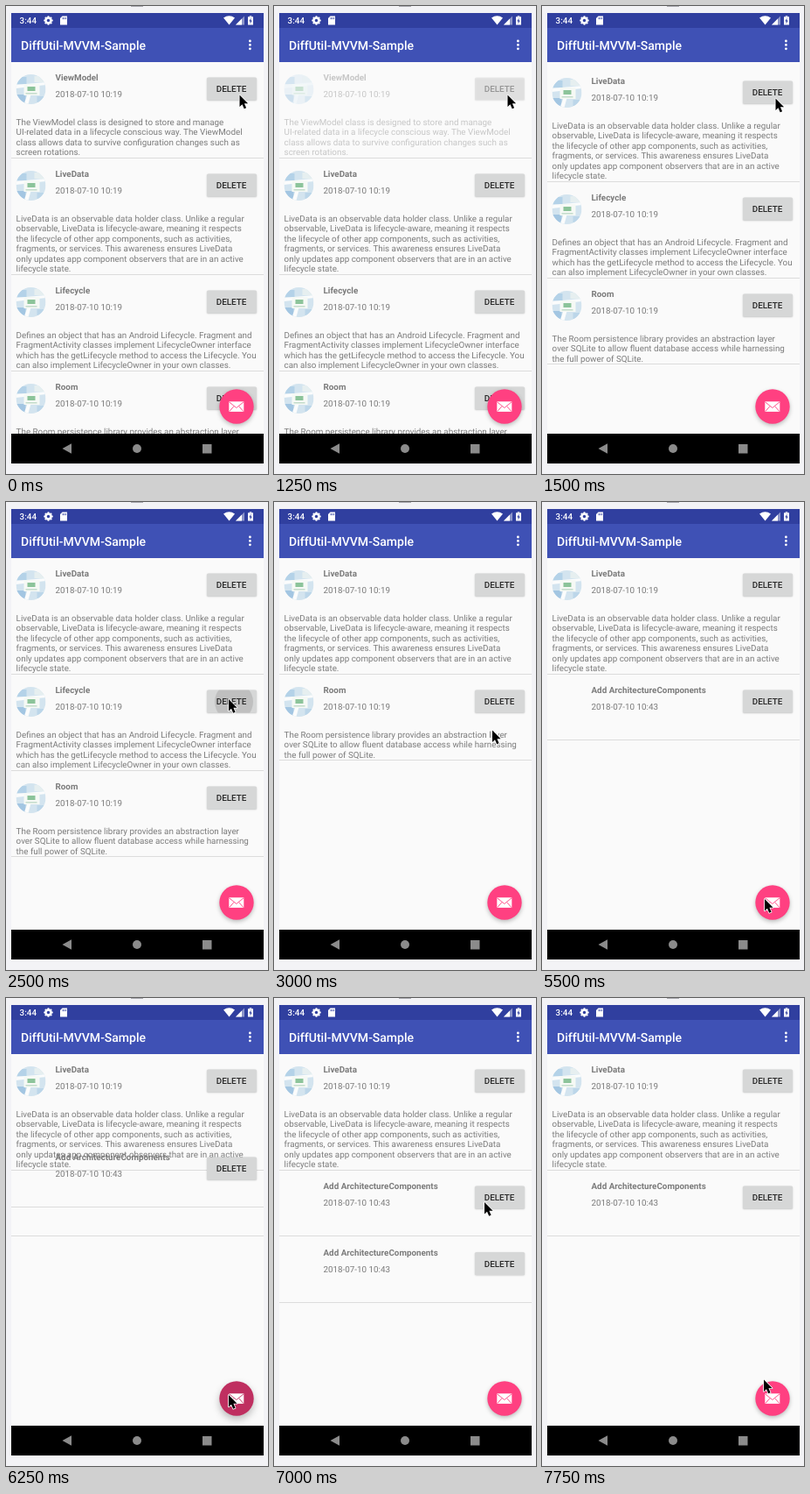
An HTML page with a canvas that plays this animation: 300 by 534 pixels, repeating every 8000 ms.

```html
<!DOCTYPE html>
<html lang="en">
<head>
<meta charset="utf-8">
<title>List demo</title>
<style>
  html, body { margin: 0; width: 100%; height: 100%; overflow: hidden; background: #f3f3f6; }
  canvas { display: block; width: 300px; height: 534px; }
</style>
</head>
<body>
<canvas id="stage" width="300" height="534"></canvas>
<script>
const ctx = document.getElementById('stage').getContext('2d');
const LOOP = 8000;
const LINE = 11.5;
const GREY = '#7b7b7b';

const cards = {
  viewModel: { title: 'ViewModel', date: '2018-07-10 10:19', photo: true, lines: [
    'The ViewModel class is designed to store and manage',
    'UI-related data in a lifecycle conscious way. The ViewModel',
    'class allows data to survive configuration changes such as',
    'screen rotations.'] },
  liveData: { title: 'LiveData', date: '2018-07-10 10:19', photo: true, lines: [
    'LiveData is an observable data holder class. Unlike a regular',
    'observable, LiveData is lifecycle-aware, meaning it respects',
    'the lifecycle of other app components, such as activities,',
    'fragments, or services. This awareness ensures LiveData',
    'only updates app component observers that are in an active',
    'lifecycle state.'] },
  lifecycle: { title: 'Lifecycle', date: '2018-07-10 10:19', photo: true, lines: [
    'Defines an object that has an Android Lifecycle. Fragment and',
    'FragmentActivity classes implement LifecycleOwner interface',
    'which has the getLifecycle method to access the Lifecycle. You',
    'can also implement LifecycleOwner in your own classes.'] },
  room: { title: 'Room', date: '2018-07-10 10:19', photo: true, lines: [
    'The Room persistence library provides an abstraction layer',
    'over SQLite to allow fluent database access while harnessing',
    'the full power of SQLite.'] },
  added: { title: 'Add ArchitectureComponents', date: '2018-07-10 10:43', photo: false, lines: [''] }
};

const { viewModel, liveData, lifecycle, room, added } = cards;
const heightOf = card => 64 + LINE * card.lines.length;
const place = (card, top, alpha = 1) => ({ card, top, alpha });

function stack(list, top = 64) {
  return list.map(card => {
    const item = place(card, top);
    top += heightOf(card);
    return item;
  });
}

function fade(items, index, alpha) {
  items[index].alpha = alpha;
  return items;
}

const steps = [
  { at: 0, cursor: [267.5, 101.5], items: stack([viewModel, liveData, lifecycle, room]), fab: 'idle' },
  { at: 1250, items: fade(stack([viewModel, liveData, lifecycle, room]), 0, 0.4) },
  { at: 1500, cursor: [267.5, 105.5], items: stack([liveData, lifecycle, room], 68) },
  { at: 1750, cursor: [255, 127], items: stack([liveData, lifecycle, room]) },
  { at: 2000, cursor: [260.5, 207] },
  { at: 2250, cursor: [255, 225] },
  { at: 2500, ripple: [261, 228] },
  { at: 2750, items: [...stack([liveData]), place(room, 253)] },
  { at: 3000, cursor: [250, 260.5], items: stack([liveData, room]) },
  { at: 3250, cursor: [250, 225] },
  { at: 3500, ripple: [257, 228] },
  { at: 3750, cursor: [218, 74], items: stack([liveData]) },
  { at: 4000, cursor: [267.5, 210] },
  { at: 4250, cursor: [267.5, 404] },
  { at: 4500, cursor: [255, 453] },
  { at: 5250, items: stack([liveData, added]), fab: 'touched' },
  { at: 5500, fab: 'idle' },
  { at: 6250, items: [...stack([liveData]), place(added, 197, 0), place(added, 164)], fab: 'pressed' },
  { at: 6500, cursor: [248, 368], items: fade(stack([liveData, added, added]), 1, 0.4), fab: 'idle' },
  { at: 6750, cursor: [239, 249], items: stack([liveData, added, added]) },
  { at: 7000, cursor: [241, 233] },
  { at: 7250, cursor: [244, 320], items: fade(stack([liveData, added, added]), 1, 0.4) },
  { at: 7500, cursor: [252, 438], items: [...stack([liveData]), place(added, 201)] },
  { at: 7750, cursor: [254, 435.5], items: stack([liveData, added]) }
];
for (let i = 1; i < steps.length; i++) {
  steps[i] = { ...steps[i - 1], ripple: null, ...steps[i] };
}

function rect(color, x, y, w, h) {
  ctx.fillStyle = color;
  ctx.fillRect(x, y, w, h);
}

function disc(color, x, y, r) {
  ctx.fillStyle = color;
  ctx.beginPath();
  ctx.arc(x, y, r, 0, Math.PI * 2);
  ctx.fill();
}

function polygon(color, points) {
  ctx.fillStyle = color;
  ctx.beginPath();
  points.forEach(([x, y]) => ctx.lineTo(x, y));
  ctx.closePath();
  ctx.fill();
}

function text(str, x, y, size, weight, color) {
  ctx.font = `${weight} ${size}px Roboto, sans-serif`;
  ctx.fillStyle = color;
  ctx.fillText(str, x, y);
}

function shadow(color, blur, dy) {
  ctx.shadowColor = color;
  ctx.shadowBlur = blur;
  ctx.shadowOffsetY = dy;
}

function drawPhoto(x, y) {
  ctx.save();
  ctx.translate(x, y);
  ctx.beginPath();
  ctx.arc(0, 0, 17, 0, Math.PI * 2);
  ctx.clip();
  rect('#d3e4ef', -17, -17, 34, 34);
  rect('#b4d2e8', -17, -14, 12, 8);
  rect('#e6eff0', 4, -15, 12, 7);
  rect('#a3c6e2', -17, 6, 11, 11);
  rect('#bcd6e9', 7, 8, 10, 7);
  polygon('#fbfcfc', [[-17, -5], [17, -8], [17, -5], [-17, -1]]);
  polygon('#fbfcfc', [[-8, 17], [-4, 6], [0, 6], [-3, 17]]);
  rect('#f6f9f5', -8, -6, 18, 13);
  rect('#8cc49a', -4, -3, 9, 5);
  rect('#c4dccb', -6, 4, 13, 1.5);
  ctx.restore();
}

function drawButton(top, ripple) {
  ctx.save();
  ctx.beginPath();
  ctx.roundRect(230, top + 17.6, 57, 25.8, 1.5);
  shadow('rgba(0,0,0,.22)', 2, 0.7);
  ctx.fillStyle = '#d6d7d7';
  ctx.fill();
  shadow('transparent', 0, 0);
  if (ripple) {
    ctx.clip();
    disc('rgba(0,0,0,.11)', ...ripple, 22);
  }
  ctx.restore();
  text('DELETE', 240.8, top + 34.3, 9.84, 500, '#262626');
}

function drawCard({ card, top, alpha }, ripple) {
  ctx.globalAlpha = alpha;
  if (card.photo) drawPhoto(28.5, top + 31);
  text(card.title, 56.5, top + 21.3, 9.84, 700, GREY);
  text(card.date, 56.5, top + 40.3, 9.84, 400, GREY);
  card.lines.forEach((line, i) => text(line, 11.6, top + 71.7 + i * LINE, 9.84, 400, GREY));
  const hit = ripple && ripple[1] > top && ripple[1] < top + 60;
  drawButton(top, hit ? ripple : null);
  ctx.globalAlpha = 1;
  rect('#dcdcdc', 6, Math.floor(top + heightOf(card) - 1), 289, 1);
}

function drawFab(state) {
  const pressed = state === 'pressed';
  const color = { idle: '#ff4081', touched: '#e23a74', pressed: '#bf2f60' }[state];
  ctx.save();
  shadow('rgba(0,0,0,.26)', pressed ? 9 : 5, pressed ? 4 : 2);
  disc(color, 264, 457, 19.7);
  ctx.restore();
  rect('#fff', 255.3, 451.3, 17, 11.6);
  ctx.strokeStyle = color;
  ctx.lineWidth = 0.9;
  ctx.beginPath();
  ctx.moveTo(255.5, 451.8);
  ctx.lineTo(263.8, 458.5);
  ctx.lineTo(272.1, 451.8);
  ctx.moveTo(255.8, 462.6);
  ctx.lineTo(261, 456.6);
  ctx.moveTo(271.8, 462.6);
  ctx.lineTo(266.6, 456.6);
  ctx.stroke();
}

function drawStatusBar() {
  rect('#303f9f', 6, 8, 289, 17);
  text('3:44', 15.6, 20, 9.84, 500, '#fff');

  for (let i = 0; i < 8; i++) {
    const angle = i * Math.PI / 4;
    disc('#fff', 48.5 + 4 * Math.cos(angle), 16.5 + 4 * Math.sin(angle), 1.2);
  }
  disc('#fff', 48.5, 16.5, 4);
  disc('#303f9f', 48.5, 16.5, 1.7);

  polygon('#fff', [[64.5, 11.5], [70, 11.5], [70, 21.5], [62, 21.5], [62, 14]]);
  for (let i = 0; i < 3; i++) rect('#303f9f', 64.6 + i * 1.7, 13, 0.8, 2.2);

  ctx.fillStyle = '#fff';
  ctx.beginPath();
  ctx.moveTo(255.5, 21.5);
  ctx.lineTo(249, 13.5);
  ctx.quadraticCurveTo(255.5, 9, 262, 13.5);
  ctx.fill();

  polygon('#8c95c9', [[273, 11.5], [273, 21.5], [263, 21.5]]);
  polygon('#fff', [[270, 14.5], [270, 21.5], [263, 21.5]]);
  rect('#fff', 277, 12.3, 6, 9.2);
  rect('#fff', 278.7, 11.3, 2.6, 1);
  polygon('#303f9f', [[280.6, 13.5], [278.3, 17.5], [279.8, 17.5], [279.4, 20.5], [281.8, 16.4], [280.3, 16.4]]);
}

function drawToolbar() {
  rect('#3f51b5', 6, 25, 289, 39);
  text('DiffUtil-MVVM-Sample', 17, 49.5, 14.06, 500, '#fff');
  for (const y of [40, 44.4, 48.8]) disc('#fff', 279.4, y, 1.4);
}

function drawNavigation() {
  rect('#000', 6, 488, 289, 34);
  polygon('#8b8b8b', [[64.5, 505], [75, 499.2], [75, 510.8]]);
  disc('#8b8b8b', 150, 505, 5);
  rect('#8b8b8b', 225, 500, 10.5, 10.5);
}

function drawCursor([x, y]) {
  ctx.save();
  ctx.translate(x, y);
  ctx.strokeStyle = '#fff';
  ctx.lineWidth = 1.6;
  ctx.lineJoin = 'round';
  polygon('#000', [[0, 0], [0, 13.5], [3, 10.7], [5.2, 15.8], [7.6, 14.8], [5.4, 9.8], [9.6, 9.8]]);
  ctx.stroke();
  ctx.fill();
  ctx.restore();
}

function draw(time) {
  const step = steps.findLast(s => s.at <= time);
  rect('#f3f3f6', 0, 0, 300, 534);
  rect('#a8a8ae', 143, 0, 14, 1);
  ctx.save();
  ctx.beginPath();
  ctx.rect(6, 8, 289, 514);
  ctx.clip();
  rect('#fafafa', 6, 8, 289, 514);
  step.items.forEach(item => drawCard(item, step.ripple));
  drawToolbar();
  drawStatusBar();
  drawFab(step.fab);
  drawNavigation();
  ctx.restore();
  drawCursor(step.cursor);
}

ctx.textRendering = 'geometricPrecision';
const start = performance.now();
function tick() {
  draw((performance.now() - start) % LOOP);
  requestAnimationFrame(tick);
}
tick();
</script>
</body>
</html>
```
